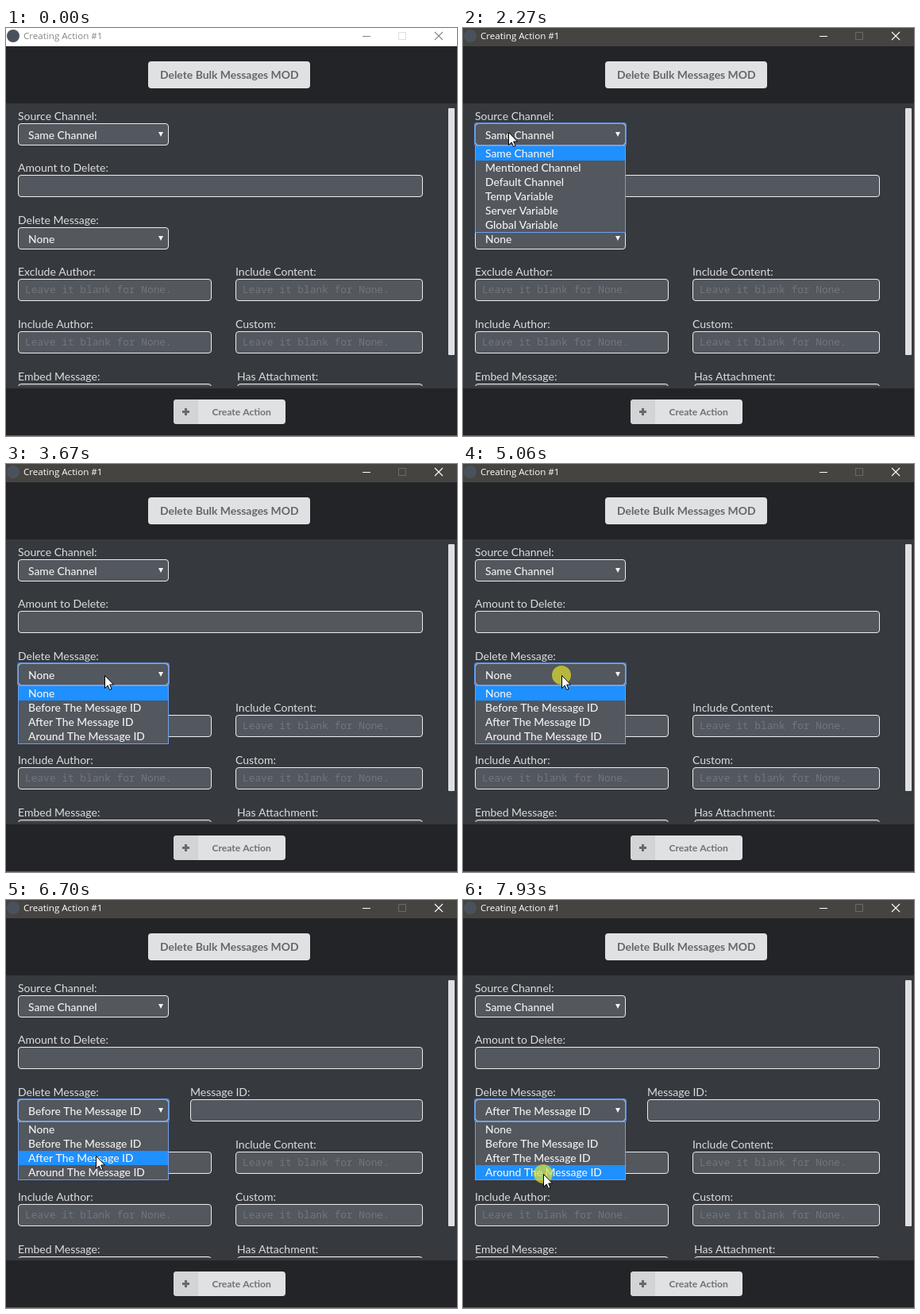
Animation, 568 px wide and 514 px high, one loop 8000 ms. Source, as an HTML page with a canvas:

```html
<!DOCTYPE html>
<html lang="en">
<head>
<meta charset="utf-8">
<title>Creating Action</title>
<style>
html, body { margin: 0; width: 100%; height: 100%; overflow: hidden; background: #232428; }
canvas { display: block; }
</style>
</head>
<body>
<canvas id="stage" width="568" height="514"></canvas>
<script>
const ctx = document.getElementById('stage').getContext('2d');
const LOOP = 8000, PRESS = 80, ENTER = 870, FOCUS = 2120;
const LATO = 'Lato, sans-serif';
const LABEL_FONT = '14px ' + LATO;
const VALUE_FONT = '500 13.85px ' + LATO;
const HINT_FONT = '12.83px "Noto Sans Mono", monospace';
const CHANNELS = ['Same Channel', 'Mentioned Channel', 'Default Channel',
  'Temp Variable', 'Server Variable', 'Global Variable'];
const MODES = ['None', 'Before The Message ID', 'After The Message ID', 'Around The Message ID'];

// The pointer's script: moves to a place, and presses that change the form on release
const moves = [], presses = [];
const go = (start, end, x, y) => moves.push({ start, end, x, y });
const press = (time, change) => presses.push({ time, change });

go(ENTER, 1540, 351, 65);
go(1640, 1950, 57, 131);
press(FOCUS, { open: 'channel' });
press(2810, { open: null });
go(2890, 3560, 124, 266);
press(3580, { open: 'mode' });
press(5060, { open: null });
press(5460, { open: 'mode' });
go(5670, 5840, 126, 311);
for (let i = 0; i < 2; i++) {
  const start = 5990 + 860 * i, x = 113 - 12 * i;
  press(start, { open: null, mode: i + 1 });
  go(start + 80, start + 380, x + 5, 266);
  press(start + 400, { open: 'mode' });
  go(start + 480, start + 700, x, 322 + 23 * i);
}
press(7930, { open: null });

function pointerAt(t) {
  if (t < ENTER) return null;
  let x = 556, y = 200;
  for (const m of moves) {
    const k = Math.min(1, Math.max(0, (t - m.start) / (m.end - m.start)));
    const e = k * k * (3 - 2 * k);
    x += (m.x - x) * e;
    y += (m.y - y) * e;
  }
  return { x: Math.round(x), y: Math.round(y) };
}

function formAt(t) {
  const done = presses.filter(p => t >= p.time + PRESS).map(p => p.change);
  return Object.assign({ open: null, mode: 0 }, ...done);
}

function rect(x, y, w, h, fill) {
  ctx.fillStyle = fill;
  ctx.fillRect(x, y, w, h);
}

function round(x, y, w, h, r, fill, stroke) {
  ctx.beginPath();
  ctx.roundRect(x, y, w, h, r);
  if (fill) { ctx.fillStyle = fill; ctx.fill(); }
  if (stroke) { ctx.strokeStyle = stroke; ctx.lineWidth = 1; ctx.stroke(); }
}

function disc(x, y, r, fill) {
  ctx.beginPath();
  ctx.arc(x, y, r, 0, 7);
  ctx.fillStyle = fill;
  ctx.fill();
}

function text(str, x, y, color, font) {
  ctx.font = font;
  ctx.fillStyle = color;
  ctx.fillText(str, x, y);
}

function line(x1, y1, x2, y2, color) {
  ctx.beginPath();
  ctx.moveTo(x1, y1);
  ctx.lineTo(x2, y2);
  ctx.strokeStyle = color;
  ctx.lineWidth = 1.1;
  ctx.stroke();
}

const label = (str, x, y) => text(str, x, y, '#dcddde', LABEL_FONT);
const value = (str, x, y) => text(str, x, y, '#f2f2f2', VALUE_FONT);
const box = (x, y, w, h = 28) => round(x + .5, y + .5, w - 1, h - 1, 3.5, '#53575e', '#eceded');

function field(name, x, y, w) {
  label(name, x, y - 4);
  box(x, y, w);
  text('Leave it blank for None.', x + 9, y + 18, '#72767c', HINT_FONT);
}

function select(name, y, chosen, open) {
  label(name, 15, y - 4);
  box(15, y, 190);
  if (open) {
    round(14.5, y - .5, 191, 29, 2, null, '#5b8fe0');
    round(15.5, y + .5, 189, 27, 2, null, '#7ba6ea');
  }
  value(chosen, 28, y + 20);
  ctx.beginPath();
  ctx.moveTo(192, y + 11);
  ctx.lineTo(198, y + 11);
  ctx.lineTo(195, y + 17);
  ctx.fill();
}

function list(items, y, hover) {
  const h = items.length * 18;
  rect(15, y, 190, h + 2, '#6f9fe8');
  rect(16, y + 1, 188, h, '#53575e');
  items.forEach((item, i) => {
    const top = y + 1 + i * 18;
    if (i === hover) rect(16, top, 188, 18, '#1e90ff');
    value(item, 28, top + 14);
  });
}

function titleBar(active) {
  const ink = active ? '#fff' : '#868686';
  rect(0, 0, 568, 23, active ? '#464441' : '#fff');
  disc(9, 10, 8, '#49525c');
  text('Creating Action #1', 22, 14, ink, '11.6px "Open Sans", sans-serif');
  rect(449, 10, 10, 1, ink);
  round(494.5, 5.5, 9, 9, 0, null, active ? '#6c6a67' : '#dedede');
  line(540, 5, 550, 15, ink);
  line(550, 5, 540, 15, ink);
}

function outline(path) {
  const p = new Path2D(path);
  ctx.fillStyle = '#fff';
  ctx.strokeStyle = '#000';
  ctx.lineWidth = 1;
  ctx.lineJoin = 'round';
  ctx.fill(p);
  ctx.stroke(p);
}

const arrow = () => outline('M.5 .5V16.5L4.2 13L6.6 18.5L9 17.5L6.7 12H11.5Z');

function hand() {
  outline('M-1 1L0 0H1L2 1V6L4 5.5L5 7L7 6.5L8 8H10L11 10V15L9 18V21H0V19L-3 15L-5 12V10H-3L-1 12Z');
  for (let x = 2.5; x < 9; x += 3) line(x, 8, x, 11, '#000');
}

function drawForm({ open, mode }, pointer) {
  const shift = mode ? 1 : 0;

  ctx.save();
  ctx.beginPath();
  ctx.rect(0, 95, 568, 356);
  ctx.clip();
  select('Source Channel:', 120, CHANNELS[0], open === 'channel');
  label('Amount to Delete:', 15, 181);
  box(15, 185, 510);
  select('Delete Message:', 251, MODES[mode], open === 'mode');
  if (mode) {
    label('Message ID:', 232, 247);
    box(232, 251, 293);
  }
  field('Exclude Author:', 15, 316 + shift, 244);
  field('Include Content:', 289, 316 + shift, 236);
  field('Include Author:', 15, 382 + shift, 244);
  field('Custom:', 289, 382 + shift, 236);
  label('Embed Message:', 15, 444 + shift);
  label('Has Attachment:', 291, 444 + shift);
  box(15, 448 + shift, 244);
  box(291, 448 + shift, 234);
  round(557, 101, 8, 311 - shift, 1, '#dfe0e2');
  ctx.restore();

  if (open === 'channel') list(CHANNELS, 148, 0);
  if (open === 'mode') {
    const row = Math.floor((pointer.y - 280) / 18);
    list(MODES, 279, row < 0 ? mode : row);
  }
}

function draw(t) {
  const p = pointerAt(t);
  const hot = p && p.x >= 179 && p.x < 383 && p.y >= 42 && p.y < 76;

  rect(0, 0, 568, 514, '#232428');
  titleBar(t >= FOCUS);
  rect(0, 95, 568, 359, '#36393e');

  round(179, 42, 204, 34, 4, hot ? '#cacbcd' : '#e0e1e2');
  text('Delete Bulk Messages MOD', 194, 64, hot ? '#38393b' : '#666768', 'bold 13.92px ' + LATO);

  drawForm(formAt(t), p);

  round(211, 468, 141, 31, 4, '#e0e1e2');
  round(211, 468, 31, 31, [4, 0, 0, 4], '#d3d4d5');
  rect(222, 482, 9, 3, '#68696a');
  rect(225, 479, 3, 9, '#68696a');
  text('Create Action', 259.5, 488, '#707172', 'bold 12.1px ' + LATO);
  rect(0, 513, 568, 1, '#5c5d60');

  if (!p) return;
  if (presses.some(({ time }) => t >= time && t < time + PRESS)) {
    disc(p.x, p.y, 12, 'rgba(225, 225, 45, .7)');
  }
  ctx.save();
  ctx.translate(p.x, p.y);
  if (hot) hand(); else arrow();
  ctx.restore();
}

function tick() {
  draw(performance.now() % LOOP);
  requestAnimationFrame(tick);
}
tick();
</script>
</body>
</html>
```
